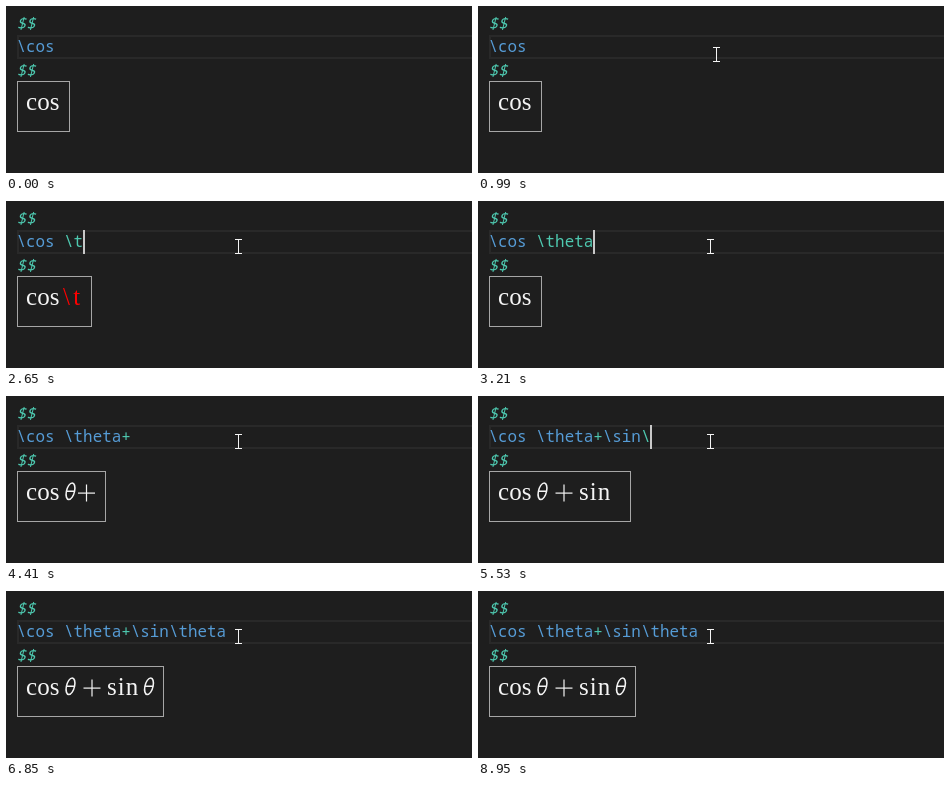
Recreate the animation shown at these times as an HTML page with a canvas. Size 466 by 167 pixels, loop 9300 ms.

```html
<!DOCTYPE html>
<html lang="en">
<head>
<meta charset="utf-8">
<title>Live formula preview</title>
<style>
html, body { margin: 0; width: 466px; height: 167px; overflow: hidden; background: #1e1e1e; }
canvas { display: block; }
</style>
</head>
<body>
<canvas width="466" height="167"></canvas>
<script>
const ctx = document.querySelector('canvas').getContext('2d');
const LOOP = 9300, LEFT = 10.4, ADVANCE = 9.53;
const TEAL = '#4ec9b0', BLUE = '#569cd6', WHITE = '#f4f4f4';
const MONO = '15.88px "Noto Sans Mono", monospace';
const MATH = '25px "Liberation Serif", serif';
const SOURCE = '\\cos \\theta+\\sin\\theta';

// time, typed characters, characters coloured blue, formula terms, unfinished command
const STATES = [
  [0, 5, 4, 1, ''],
  [2230, 6, 4, 1, ''],
  [2300, 6, 4, 1, ' '],
  [2650, 7, 4, 1, '\\t'],
  [2790, 8, 4, 1, '\\th'],
  [2930, 9, 4, 1, '\\the'],
  [3000, 10, 4, 1, '\\thet'],
  [3210, 11, 4, 1, ''],
  [3290, 11, 11, 2, ''],
  [3780, 12, 11, 2, ''],
  [3920, 12, 11, 3, ''],
  [4550, 13, 11, 3, ' '],
  [4900, 14, 11, 3, '\\s'],
  [5040, 15, 11, 3, '\\si'],
  [5180, 16, 16, 4, ''],
  [5530, 17, 16, 4, ' '],
  [5810, 18, 16, 4, '\\t'],
  [5950, 19, 16, 4, '\\th'],
  [6090, 20, 16, 4, '\\the'],
  [6150, 21, 16, 4, '\\thet'],
  [6360, 22, 22, 5, '']
];
const CARET_ON = [[70, 570], [1260, 1810], [2230, 4410], [4550, 6850], [7410, 7970], [8460, 8950]];
const BOX_END = [0, 64, 80, 100, 141, 158];
const TAIL_X = [0, 57, 74, 101, 134];

function text(str, x, y, color, font, spacing = 0) {
  ctx.font = font;
  ctx.letterSpacing = spacing + 'px';
  ctx.fillStyle = color;
  ctx.fillText(str, x, y);
  return ctx.measureText(str).width;
}

function theta(x) {
  ctx.save();
  ctx.transform(1, 0, -0.2, 1, x, 95.2);
  ctx.strokeStyle = WHITE;
  ctx.lineWidth = 1.5;
  ctx.beginPath();
  ctx.ellipse(0, 0, 4.1, 8.3, 0, 0, 2 * Math.PI);
  ctx.moveTo(-4, 0);
  ctx.lineTo(4, 0);
  ctx.stroke();
  ctx.restore();
}

function plus(x) {
  ctx.fillStyle = WHITE;
  ctx.fillRect(x - 8.5, 96.5, 17, 1.2);
  ctx.fillRect(x - 0.6, 88.5, 1.2, 17);
}

function preview(terms, tail) {
  text('cos', 20, 104, WHITE, MATH, 0.1);
  if (terms > 1) theta(64.5);
  if (terms > 2) plus(terms > 3 || tail ? 86 : 80.5);
  if (terms > 3) text('sin', 101, 104, WHITE, MATH, 1);
  if (terms > 4) theta(143);
  let end = BOX_END[terms];
  if (tail) {
    const x = TAIL_X[terms];
    end = Math.round(x + 9 + text(tail, x, 104, '#ff0000', MATH, 3.3));
  }
  ctx.strokeStyle = '#a6a6a6';
  ctx.lineWidth = 1;
  ctx.strokeRect(11.5, 75.5, end - 12, 50);
}

function pointer(t) {
  if (t < 70) return;
  let x = 232, y = 45;
  if (t < 990) {
    const step = Math.min(7, Math.floor((t - 70) / 71.4));
    const rest = (1 - step / 7) ** 2;
    x = 236 + 119 * rest;
    y = 48 + 61 * rest;
  } else if (t < 1470) {
    const step = Math.min(4, Math.floor((t - 990) / 90) + 1);
    x = 236 + 7 * step / 4;
    y = 48 - 2 * step / 4;
  }
  x = Math.round(x);
  y = Math.round(y);
  ctx.fillStyle = WHITE;
  ctx.fillRect(x, y - 7, 1, 15);
  for (const edge of [y - 7, y + 7]) {
    ctx.fillRect(x - 3, edge, 3, 1);
    ctx.fillRect(x + 1, edge, 3, 1);
  }
}

function draw(t) {
  const [, typed, blue, terms, tail] = STATES.findLast(s => s[0] <= t);
  ctx.fillStyle = '#1e1e1e';
  ctx.fillRect(0, 0, 466, 167);
  ctx.strokeStyle = '#292929';
  ctx.lineWidth = 2;
  ctx.strokeRect(12, 30, 470, 22);

  for (const y of [23, 70]) text('$$', LEFT, y, TEAL, 'italic ' + MONO);
  [...SOURCE.slice(0, typed)].forEach((c, i) =>
    text(c, LEFT + i * ADVANCE, 46, i < blue && c !== '+' ? BLUE : TEAL, MONO));

  if (CARET_ON.some(([from, to]) => t >= from && t < to)) {
    ctx.fillStyle = '#c8c8c8';
    ctx.fillRect(Math.round(LEFT + typed * ADVANCE), 29, 2, 24);
  }
  preview(terms, tail);
  pointer(t);
}

function frame() {
  draw(performance.now() % LOOP);
  requestAnimationFrame(frame);
}
frame();
</script>
</body>
</html>
```
